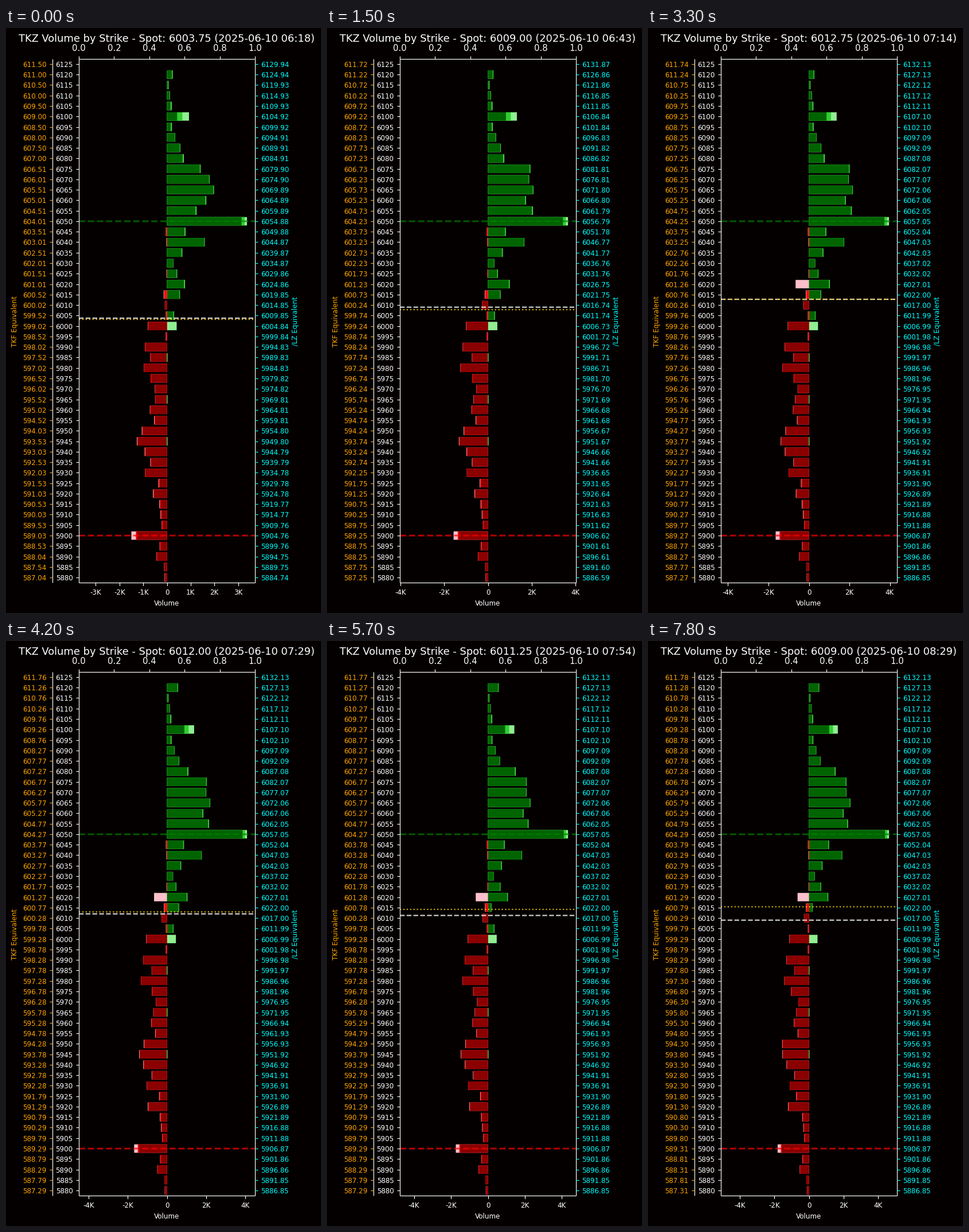
Animation, 549 px wide and 1020 px high, one loop 8 s. Source, as a matplotlib script:

```python
import random
import numpy as np
import matplotlib.pyplot as plt
from matplotlib.animation import FuncAnimation
from matplotlib.patches import Rectangle

W, H = 549, 1020
LEFT, RIGHT, TOP, BOTTOM = 127, 434, 53.8, 967.2
MID, HALF = (LEFT + RIGHT) / 2, (RIGHT - LEFT) / 2
PT = 1.488                      # pixels per typographic point
SMALL, MEDIUM, LARGE = 8 * PT, 10 * PT, 12 * PT
TICK, GAP = 3.5 * PT, 7 * PT
BG, CYAN, ORANGE = "#040000", "cyan", "orange"
STRIKES = range(6125, 5875, -5)
LAST = 26

# Key points over the states; values between are interpolated.
KEYS = (0, 3, 7, 11, 16, 22, LAST)
SPOT = (6003.75, 6009.25, 6008.75, 6012.75, 6011.5, 6011, 6009)
PIVOT = (6003.2, 6007.7, 6007.9, 6012.75, 6013.1, 6015.2, 6015.4)
FUND = (.09983626, .09986985, .09987566, .09987661,
        .09988125, .09987890, .09988225)
FUTURE = (1.0008069, 1.0010781, 1.00116507, 1.0011645)

# Opening volumes in tens, one per strike downwards from the first.
CALLS = (6120, (24, 7, 13, 20, 93, 21, 35, 56, 71, 142, 180, 198, 166, 125,
                337.5, 78, 159, 65, 28, 43, 76, 55, 0, 30, 41))
PUTS = (6045, (5, 3, 0, 0, 2, 0, 14, 9, 5, 81, 5, 93, 70, 98, 69, 51, 50, 72,
               54, 106, 127, 94, 70, 92, 36, 59, 32, 27, 22, 150, 31, 44,
               12, 10))
LEADER, LEADER_GROWTH, GROWTH = 6050, .375, .21

# Single large trades: strike, state, tens of contracts
CALL_TRADES = ((6120, 12, 30), (6100, 4, 35), (6100, 24, 20), (6080, 13, 30),
               (6080, 19, 38), (6075, 5, 45), (6055, 5, 75), (6045, 24, 22),
               (6025, 19, 18), (6020, 5, 20), (6015, 19, -45), (6005, 20, -40))
PUT_TRADES = ((6020, 9, 66), (6010, 2, 18), (6000, 2, 16), (5990, 2, 18),
              (5980, 2, 24), (5975, 24, 20), (5965, 5, 14), (5950, 24, 27),
              (5940, 9, 16), (5925, 24, 30), (5920, 14, 32), (5920, 20, 18))

# Bars with wide bright and light ends: (side, strike) -> widths
ENDS = {(1, 6100): (22, 28), (1, LEADER): (13, 10), (1, 6000): (0, 99),
        (-1, 6020): (0, 99), (-1, 6015): (13, 2), (-1, 5900): (5, 19)}

plt.rcParams["font.family"] = "DejaVu Sans"
fig = plt.figure(figsize=(W / 72, H / 72), dpi=72, facecolor=BG)
ax = fig.add_axes([0, 0, 1, 1])
ax.set_xlim(0, W)
ax.set_ylim(H, 0)
ax.axis("off")
rng = random.Random(6)


def at(vals, state):
    return float(np.interp(state, KEYS[:len(vals)], vals))


def row(price):
    return TOP + (6127.5 - price) * (BOTTOM - TOP) / 250


def grow(rate, state):
    return 1 + rate * (state / LAST) ** .9


def label(x, y, s="", size=SMALL, color="white", ha="center",
          va="baseline", **kw):
    return ax.text(x, y, s, size=size, color=color, ha=ha, va=va, **kw)


def level(price, color, alpha, width, style):
    y = row(price)
    return ax.plot([LEFT, RIGHT], [y, y], color=color, alpha=alpha,
                   lw=width * PT, ls=style, zorder=3, snap=False)[0]


bars = []


def bar(side, strike, start, trades=()):
    """Nested rectangles: light tip, bright middle, dark body."""
    colors = (("lightgreen", "limegreen", "darkgreen") if side > 0
              else ("pink", "red", "darkred"))
    if (side, strike) in ENDS:
        mid, tip = ENDS[side, strike]
    elif 0 < start < 6:
        mid, tip = 9, 0
    else:
        mid, tip = rng.uniform(.8, 4), rng.choice((0, .5, 1, 2))
    own = [(when, size) for k, when, size in trades if k == strike]
    rate = LEADER_GROWTH if strike == LEADER else GROWTH
    for color, cut in zip(colors, (0, tip, tip + mid)):
        r = Rectangle((MID, row(strike + 2)), 0, row(0) - row(4), fc=color,
                      lw=0, snap=False, zorder=2)
        ax.add_patch(r)
        bars.append((r, side, start, rate, own, cut))


for side, (first, volumes), trades in ((1, CALLS, CALL_TRADES),
                                       (-1, PUTS, PUT_TRADES)):
    for i, volume in enumerate(volumes):
        bar(side, first - 5 * i, volume, trades)
for strike in (5985, 5965, 5945):
    bar(1, strike, 2.2)

level(LEADER, "green", .7, 2, "--")
level(5900, "red", .7, 2, "--")
spot_line = level(SPOT[0], "white", .8, 1.5, "--")
pivot_line = level(PIVOT[0], "gold", .8, 1.5, ":")

# Frame, second left spine and fixed ticks
AXIS = dict(color="white", lw=.8 * PT, zorder=4)
ax.vlines([81, LEFT, RIGHT], TOP, BOTTOM, **AXIS)
ax.hlines([TOP, BOTTOM], LEFT, RIGHT, **AXIS)
rows = [row(k) for k in STRIKES]
for x, color in ((81 - TICK, ORANGE), (LEFT - TICK, "white"), (RIGHT, CYAN)):
    ax.hlines(rows, x, x + TICK, **{**AXIS, "color": color})
for i in range(6):
    x = LEFT + (RIGHT - LEFT) * i / 5
    ax.vlines(x, TOP - TICK, TOP, **AXIS)
    label(x, TOP - GAP, f"{i / 5:.1f}", MEDIUM, va="bottom")

title = label(MID, 24.5, size=LARGE)
label(MID, 1007, "Volume")
label(15.5, 511, "TKF Equivalent", color=ORANGE, va="center", rotation=90)
label(504.5, 511, "/LZ Equivalent", color=CYAN, va="center", rotation=90)

fund_labels, future_labels = [], []
for strike, y in zip(STRIKES, rows):
    side = dict(va="center_baseline")
    label(LEFT - GAP, y, str(strike), ha="right", **side)
    fund_labels.append(label(81 - GAP, y, color=ORANGE, ha="right", **side))
    future_labels.append(label(RIGHT + GAP, y, color=CYAN, ha="left", **side))

volume_ticks = []
for k in range(-4, 5):
    mark = ax.plot([MID, MID], [BOTTOM, BOTTOM + TICK], **AXIS)[0]
    volume_ticks.append((k, mark, label(MID, 988.4, f"{k}K" if k else "0")))


def update(frame):
    state = min(frame // 3, LAST)
    limit = 1.1 * max(CALLS[1]) * grow(LEADER_GROWTH, state)
    scale = HALF / limit

    for rect, side, start, rate, trades, cut in bars:
        size = start * grow(rate, state) - cut
        size += sum(extra for when, extra in trades if state >= when)
        rect.set_width(side * max(size, 0) * scale)

    step = 1 if limit <= 400 else 2
    for k, mark, text in volume_ticks:
        x = MID + 100 * k * scale
        shown = k % step == 0 and abs(k) * 100 <= limit
        mark.set_xdata([x, x])
        text.set_x(x)
        mark.set_visible(shown)
        text.set_visible(shown)

    spot = round(at(SPOT, state) * 4) / 4
    spot_line.set_ydata([row(spot)] * 2)
    pivot_line.set_ydata([row(at(PIVOT, state))] * 2)

    minute = 6 * 60 + 18 + 5 * state + (state > 5)
    title.set_text(f"TKZ Volume by Strike - Spot: {spot:.2f} "
                   f"(2025-06-10 {minute // 60:02d}:{minute % 60:02d})")

    fund, future = at(FUND, state), at(FUTURE, state)
    for strike, a, b in zip(STRIKES, fund_labels, future_labels):
        a.set_text(f"{strike * fund:.2f}")
        b.set_text(f"{strike * future:.2f}")
    return []


anim = FuncAnimation(fig, update, frames=80, interval=100,
                     init_func=lambda: update(0), repeat=True,
                     repeat_delay=0, blit=False, cache_frame_data=False)
plt.show()
```
